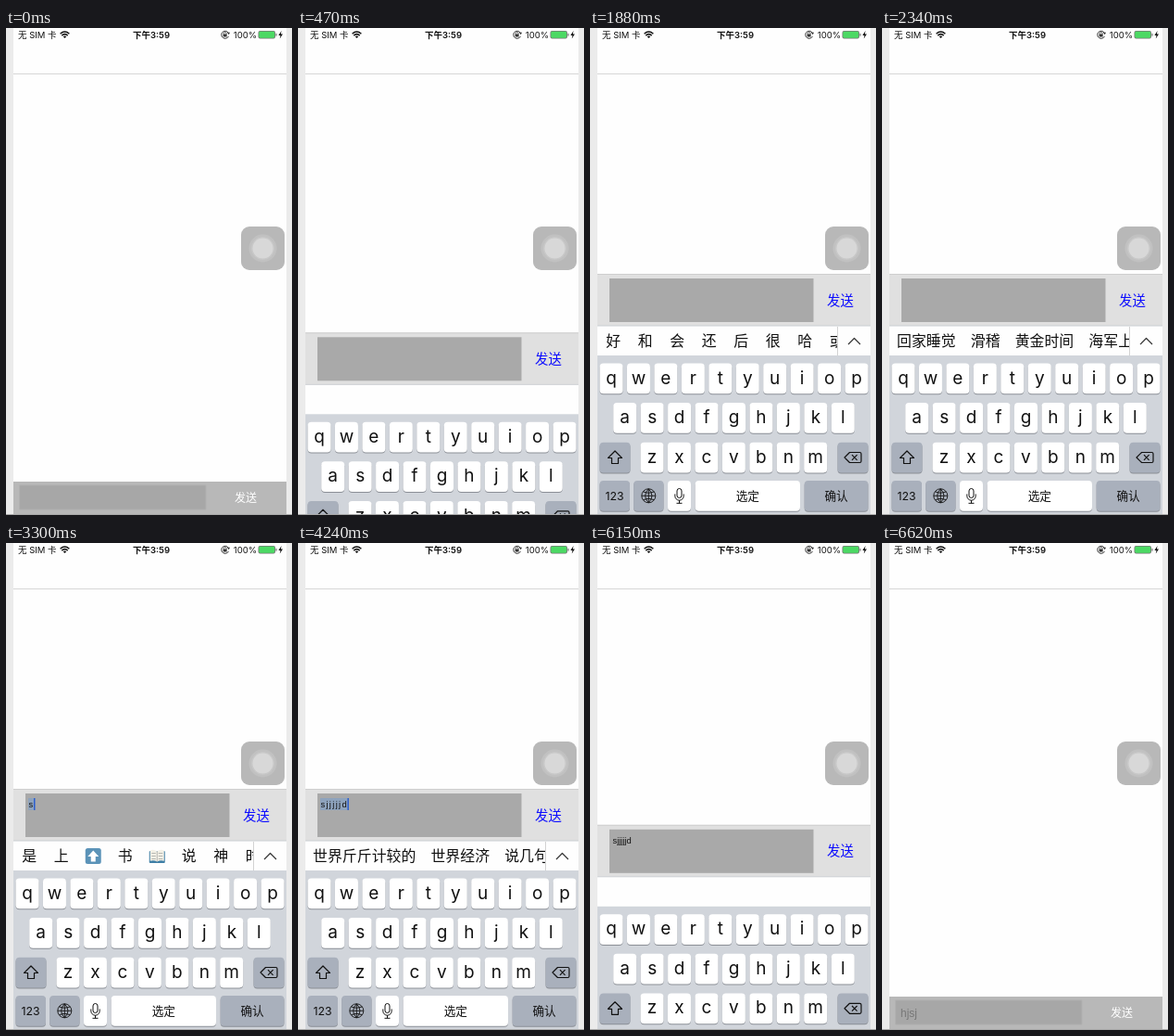
Recreate the animation shown at these times as an HTML page. Size 309 px wide and 525 px high, loop 7.82 s.

```html
<!DOCTYPE html>
<html lang="zh-CN">
<head>
<meta charset="utf-8">
<style>
  html, body { margin: 0; width: 100%; height: 100%; overflow: hidden; background: #fefefe; }
  svg { display: block; width: 309px; height: 525px; }
  text { font-family: Inter, "Noto Sans CJK SC", "Noto Sans CJK", sans-serif; white-space: pre; }
  .field { font-family: "Liberation Sans", Arial, sans-serif; }
</style>
</head>
<body>
<svg id="stage" viewBox="0 0 309 525" xmlns="http://www.w3.org/2000/svg">
  <defs><clipPath id="strip"><rect x="8" y="322" width="259" height="31"/></clipPath></defs>
</svg>
<script>
const LOOP = 7820, TRAVEL = 260;
const DARK_KEY = '#a9b0bc', FIELD = '#a9a9a9';
const stage = document.getElementById('stage');

function add(parent, tag, attrs, content) {
  const el = document.createElementNS('http://www.w3.org/2000/svg', tag);
  for (const k in attrs) el.setAttribute(k, attrs[k]);
  if (content !== undefined) el.textContent = content;
  parent.append(el);
  return el;
}
const box = (p, x, y, width, height, fill, rx = 0) => add(p, 'rect', { x, y, width, height, fill, rx });
const disc = (p, cx, cy, r, fill) => add(p, 'circle', { cx, cy, r, fill });
const line = (p, d, stroke = '#111', width = 1.2) =>
  add(p, 'path', { d, fill: 'none', stroke, 'stroke-width': width, 'stroke-linejoin': 'round' });
const label = (p, str, x, y, size, fill = '#111', more = {}) =>
  add(p, 'text', { x, y, 'font-size': size, fill, 'text-anchor': 'middle', ...more }, str);

// Page and status bar
box(stage, 0, 0, 309, 525, '#ebebeb');
box(stage, 8, 0, 295, 525, '#fefefe');
box(stage, 8, 49, 295, 1, '#d6d6d6');
label(stage, '无 SIM 卡', 13, 11, 9.5, '#111', { 'text-anchor': 'start' });
line(stage, 'M58.6 6.2Q63.5 1.8 68.4 6.2M60.3 8.1Q63.5 5.2 66.7 8.1', '#111', 1.5);
add(stage, 'path', { d: 'M61.7 9.2Q63.5 7.8 65.3 9.2L63.5 11Z', fill: '#111' });
label(stage, '下午3:59', 157, 11, 9.5, '#111', { 'font-weight': 600 });
line(stage, 'M240.2 5.2A4 4 0 1 0 240.4 9', '#333', 1);
line(stage, 'M235.3 7V5.7a1.3 1.3 0 0 1 2.6 0V7', '#333', .8);
box(stage, 234.6, 6.6, 4, 2.9, '#333');
add(stage, 'path', { d: 'M238.8 4.8H242L240.7 7.2Z', fill: '#333' });
label(stage, '100%', 271, 11, 9.5, '#111', { 'text-anchor': 'end' });
box(stage, 272.5, 3, 18.5, 8.5, '#777', 2);
box(stage, 273.3, 3.8, 16.9, 6.9, '#4cd964', 1.4);
box(stage, 291.4, 5.8, 1.2, 3, '#777', .6);
add(stage, 'path', { d: 'M297.6 3L294.4 7.9H296.5L295.8 11.4L299 6.5H296.9Z', fill: '#111' });

// Docked bar
box(stage, 8, 489, 295, 36, '#b8b8b8');
box(stage, 14, 492.5, 202.5, 27, '#b0b0b0', 1);
box(stage, 15, 493.5, 200.5, 25, '#a7a7a7');
const dockText = label(stage, 'hjsj', 20, 511, 12, '#777', { 'text-anchor': 'start', class: 'field' });
label(stage, '发送', 259, 511, 12, '#fff');

// Sliding panel: input bar, candidate strip, keyboard
const panel = add(stage, 'g', {});
box(panel, 8, 265, 295, 57, '#e0e0e0');
box(panel, 8, 265, 295, 1, '#cfcfcf');
box(panel, 21, 270, 220.5, 47, FIELD);
label(panel, '发送', 270.5, 298.5, 14.4, '#0c0cff');
const mark = box(panel, 24, 275, 0, 13, '#8ea3bd');
const typed = add(panel, 'text', { x: 24.5, y: 285, 'font-size': 9.4, fill: '#111', class: 'field' });
const caret = box(panel, 0, 275, 1.5, 13, '#2b5fd0');
box(panel, 8, 321, 295, 32, '#fefefe');
box(panel, 8, 320.5, 295, 1, '#cccfd3');
const strip = add(panel, 'g', {});
const words = add(strip, 'g', { 'clip-path': 'url(#strip)' });
box(strip, 267, 322, 1, 31, '#d2d2d2');
line(strip, 'M279 341L285.5 334.5L292 341', '#333');
box(panel, 8, 353, 295, 172, '#d1d5db');

function key(x, y, w, fill = '#fff') {
  box(panel, x, y + 1, w, 32.7, '#8b8f96', 4);
  return box(panel, x, y, w, 32.7, fill, 4);
}
const PITCH = 29.45;
[['qwertyuiop', 23, 361.5], ['asdfghjkl', 37.7, 404], ['zxcvbnm', 67, 446.7]].forEach(([row, x0, y]) =>
  [...row].forEach((ch, i) => {
    const x = x0 + i * PITCH;
    key(x - 12.5, y, 25);
    label(panel, ch, x, y + 22, 19);
  }));
key(10.5, 446.7, 33, DARK_KEY);
line(panel, 'M27 456L34.5 463.5H30.5V469.5H23.5V463.5H19.5Z');
key(267.5, 446.7, 33, DARK_KEY);
line(panel, 'M275 463L280.5 457.5H291.5Q293 457.5 293 459V467Q293 468.5 291.5 468.5H280.5ZM283 460.2L288.6 465.8M288.6 460.2L283 465.8');
key(10.5, 488, 32.5, DARK_KEY);
label(panel, '123', 26.5, 509, 12.3);
key(47.2, 488, 32.3, DARK_KEY);
line(panel, 'M55.8 504.3a7.5 7.5 0 1 0 15 0a7.5 7.5 0 1 0-15 0H70.8M63.3 496.8V511.8M63.3 496.8Q56 504.3 63.3 511.8Q70.6 504.3 63.3 496.8M57.5 500Q63.3 502.6 69.1 500M57.5 508.6Q63.3 506 69.1 508.6', '#111', .9);
key(84, 488, 25);
add(panel, 'rect', { x: 94, y: 496.5, width: 5, height: 10, rx: 2.5, fill: 'none', stroke: '#111' });
line(panel, 'M91.8 502.5V504.5a4.7 4.7 0 0 0 9.4 0V502.5M96.5 509.2V512.3M93.5 512.3H99.5', '#111', 1);
key(113.7, 488, 113.3);
const spaceLabel = label(panel, '', 170.3, 509, 12.6);
const enterKey = key(231.7, 488, 68.8, DARK_KEY);
const enterLabel = label(panel, '', 266, 509, 12.6);

// Enlarged "d" while it is held
const bubble = add(panel, 'g', {});
add(bubble, 'path', {
  d: 'M82 359H111Q116 359 116 364V388Q116 395 109.1 402V433Q109.1 437 105.1 437H88.1Q84.1 437 84.1 433V402Q77 395 77 388V364Q77 359 82 359Z',
  fill: '#fff', stroke: '#b4b8be', 'stroke-width': .7
});
label(bubble, 'd', 96.6, 391, 28);

// Floating assist button
box(stage, 254, 214, 47, 47, '#b8b8b8', 9);
disc(stage, 277.5, 237.5, 15, '#c1c1c1');
disc(stage, 277.5, 237.5, 12.5, '#c8c8c8');
disc(stage, 277.5, 237.5, 11, '#d8d8d8');
box(stage, 0, 524, 309, 1, '#a9a9a9');

const icons = {
  up(x) {
    box(words, x - 8.5, 329, 17, 17, '#5b93b8', 2.5);
    add(words, 'path', { d: `M${x} 331.5l6 6.5h-3.5v5.5h-5v-5.5h-3.5Z`, fill: '#fff' });
  },
  book(x) {
    box(words, x - 8.5, 332, 17, 13, '#3f7fa6', 1);
    add(words, 'path', { d: `M${x} 332.5q-4-3-7.5-.8v11q4-1.4 7.5.8q3.500-2.200 7.500-.8v-11q-3.500-2.200-7.500.8Z`, fill: '#f3f0e6' });
    line(words, `M${x} 332.500v11M${x - 6} 334.500h4.500m-4.500 3h4.500m-4.500 3h4.500M${x + 1.5} 334.500h4.500m-4.500 3h4.500m-4.500 3h4.500`, '#a9aaa5', .8);
  }
};

function showWords(list) {
  words.replaceChildren();
  strip.style.display = list ? '' : 'none';
  let x = 8;
  for (const word of list ? list.split(' ') : []) {
    const w = icons[word] ? 34.5 : Math.max(34.5, word.length * 15.9 + 16.1);
    if (icons[word]) icons[word](x + w / 2);
    else label(words, word, x + w / 2, 343, 15.9);
    x += w;
  }
}

// Keyboard curve: cubic-bezier(.38, .7, .125, 1)
function ease(t) {
  const at = (a, b, s) => 3 * a * s * (1 - s) ** 2 + 3 * b * s * s * (1 - s) + s ** 3;
  let lo = 0, hi = 1;
  for (let i = 0; i < 30; i++) {
    const mid = (lo + hi) / 2;
    if (at(.38, .125, mid) < t) lo = mid; else hi = mid;
  }
  return at(.7, 1, hi);
}
const slide = (start, from, to) => [0, 120, 240, 350, 470].map(dt =>
  [start + dt, { y: from + (to - from) * ease((dt + 38) / 508) }]);

const COMMON = '我 你 在 这 是 一 不 有';
const steps = [
  [0, { y: TRAVEL, list: '', text: '', marked: false, caret: 0, composing: false, pressed: false, bubble: false, dock: false }],
  ...slide(350, TRAVEL, 0),
  [820, { list: COMMON }],
  [1760, { list: '好 和 会 还 后 很 哈 或', composing: true }],
  [2000, { list: '回家 后 还 环境 很久 合计' }],
  [2120, { list: '和家事 会计师 回家 黄金 很' }],
  [2340, { list: '回家睡觉 滑稽 黄金时间 海军上将' }],
  [2700, { list: '', composing: false }],
  [2820, { list: COMMON, caret: 1 }],
  [3300, { list: '是 上 up 书 book 说 神 时', text: 's', marked: true, composing: true }],
  [3420, { list: '时间 实际 世界 设计 手机', text: 'sj' }],
  [3650, { list: '世界级 设计 时间 睡觉', text: 'sjj' }],
  [3770, { list: '世界经济 设计 世界 时间', text: 'sjjj' }],
  [3890, { list: '世界斤斤计 世界经济 说几句', text: 'sjjjj' }],
  [4010, { list: '世界斤斤计较 世界经济 说几句', text: 'sjjjjj' }],
  [4120, { text: 'sjjjjjd', bubble: true }],
  [4240, { list: '世界斤斤计较的 世界经济 说几句', bubble: false }],
  [4600, { pressed: true }],
  [4720, { list: COMMON, marked: false, composing: false, pressed: false }],
  [5200, { caret: .5 }],
  [5320, { caret: 0 }],
  [6150, { list: '', dock: true }],
  ...slide(6150, 0, TRAVEL)
];

function show(s) {
  panel.setAttribute('transform', `translate(0 ${s.y})`);
  dockText.style.display = s.dock ? '' : 'none';
  bubble.style.display = s.bubble ? '' : 'none';
  showWords(s.list);
  typed.textContent = s.text;
  typed.setAttribute('letter-spacing', s.marked ? 1.3 : 0);
  const w = s.text ? typed.getComputedTextLength() : 0;
  mark.setAttribute('width', s.marked ? w + .5 : 0);
  caret.setAttribute('x', 24 + w);
  caret.setAttribute('opacity', s.caret);
  spaceLabel.textContent = s.composing ? '选定' : '空格';
  enterLabel.textContent = s.composing ? '确认' : '换行';
  enterKey.setAttribute('fill', s.pressed ? '#fff' : DARK_KEY);
}

let shown = -1;
const began = performance.now();
function tick() {
  const t = (performance.now() - began) % LOOP;
  const past = steps.filter(([at]) => at <= t);
  if (past.length !== shown) {
    shown = past.length;
    show(Object.assign({}, ...past.map(([, change]) => change)));
  }
  requestAnimationFrame(tick);
}
tick();
</script>
</body>
</html>
```
